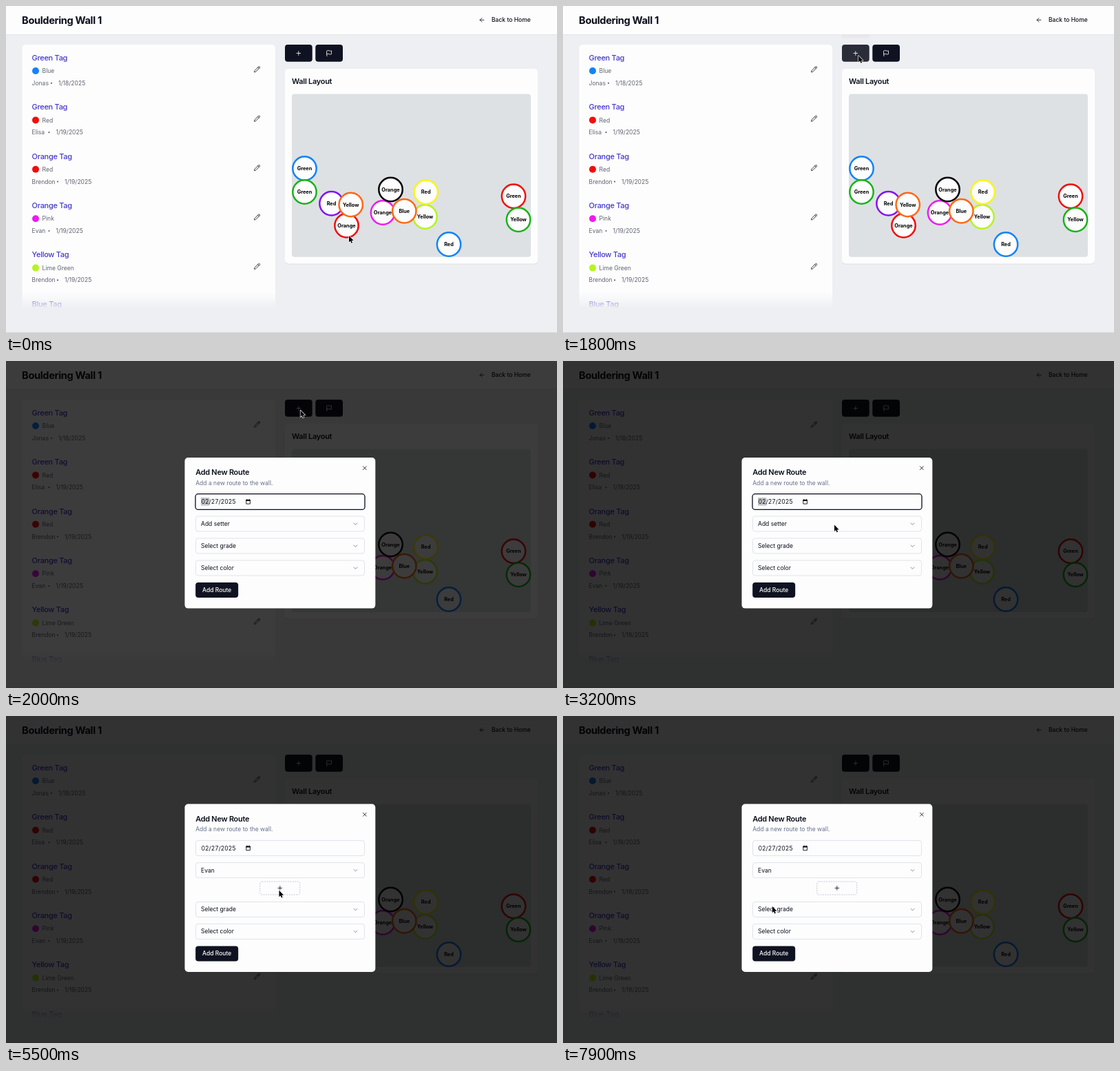
Animation of 800 by 474 pixels, one loop 8 s. Source, as an HTML page:

```html
<!DOCTYPE html>
<html lang="en">
<head>
<meta charset="utf-8">
<title>Bouldering Wall</title>
<style>
  html, body { margin: 0; width: 100%; height: 100%; overflow: hidden; background: #eeeff2; }
  svg { display: block; width: 800px; height: 474px; }
  text { font: 400 8.54px Inter, sans-serif; fill: #0b0f1a; white-space: pre; }
  .h1 { font-size: 14.64px; font-weight: 700; letter-spacing: -.025em; }
  .h2 { font-size: 10.98px; font-weight: 600; letter-spacing: -.025em; }
  .tag { font-size: 10.98px; font-weight: 500; letter-spacing: -.025em; fill: #4338ca; }
  .med { font-weight: 500; }
  .meta { fill: #5f636e; }
  .hold { font-size: 7.32px; font-weight: 700; text-anchor: middle; fill: #000; }
  .date { font-variant-numeric: tabular-nums; }
  .icon { fill: none; stroke: #0b0f1a; stroke-width: 2; stroke-linecap: round; stroke-linejoin: round; }
  .box { fill: #fdfdfe; stroke: #e0e3ea; }
</style>
</head>
<body>
<svg id="stage" viewBox="0 0 800 474" xmlns="http://www.w3.org/2000/svg"></svg>
<script>
const LOOP = 8000, STEP = 100;

const ICONS = {
  plus: 'M5 12h14M12 5v14',
  flag: 'M4 15s1-1 4-1 5 2 8 2 4-1 4-1V3s-1 1-4 1-5-2-8-2-4 1-4 1zM4 22v-7',
  back: 'M12 19l-7-7 7-7M19 12H5',
  pencil: 'M21.174 6.812a1 1 0 0 0-3.986-3.987L3.842 16.174a2 2 0 0 0-.5.83l-1.321 4.352a.5.5 0 0 0 .623.622l4.353-1.32a2 2 0 0 0 .83-.497zM15 5l4 4',
  down: 'M6 9l6 6 6-6',
  close: 'M18 6L6 18M6 6l12 12',
  user: 'M20 21a8 8 0 0 0-16 0M7 8a5 5 0 1 0 10 0a5 5 0 1 0-10 0'
};

const HUE = {
  blue: '#1383f6', red: '#f20d0d', pink: '#ee1bee', lime: '#b5f51e', purple: '#8414ee',
  orange: '#fb6a15', green: '#18b318', yellow: '#fbf41b', black: '#050505'
};

// tag, hue, hue label, setter, date, bullet x, date x
const ROUTES = [
  ['Green', 'blue', 'Blue', 'Jonas', '1/18/2025', 67.5, 76],
  ['Green', 'red', 'Red', 'Elisa', '1/19/2025', 64, 72.5],
  ['Orange', 'red', 'Red', 'Brendon', '1/19/2025', 76.5, 85],
  ['Orange', 'pink', 'Pink', 'Evan', '1/19/2025', 64, 72.5],
  ['Yellow', 'lime', 'Lime Green', 'Brendon', '1/19/2025', 76.5, 85],
  ['Blue']
];

const HOLDS = [
  ['Green', 'blue', 433.5, 235.5], ['Green', 'green', 433.5, 269.5],
  ['Red', 'purple', 472.5, 286.3], ['Orange', 'red', 494.5, 318.3],
  ['Yellow', 'orange', 500.7, 288], ['Orange', 'pink', 547, 299.5],
  ['Orange', 'black', 558.5, 266], ['Yellow', 'lime', 608.5, 305.5],
  ['Blue', 'orange', 578.3, 297.3], ['Red', 'yellow', 609.7, 269.7],
  ['Red', 'blue', 643, 345.5], ['Green', 'red', 737, 275.7],
  ['Yellow', 'green', 744, 309.7]
];

const SETTERS = ['Evan', 'Brendon', 'Oscar', 'Warrick', 'Ned', 'Lena'];

// time, x, y of the pointer tip
const POINTER = [
  [0, 498, 333], [500, 498, 333], [1400, 430, 75], [1800, 429, 72], [1900, 427.5, 71.5],
  [2200, 427.5, 71.5], [3100, 395, 238.5], [3200, 394, 237.5], [3700, 394, 237.5],
  [4000, 392.3, 261.3], [4700, 392.3, 261.3], [5300, 396.5, 252.8], [5600, 396.5, 252.8],
  [6500, 346, 268], [7000, 330, 284], [7100, 330, 284], [7900, 303.8, 275.8], [8000, 303.8, 275.8]
];

const text = (x, y, str, cls = '', extra = '') =>
  `<text x="${x}" y="${y}" class="${cls}" ${extra}>${str}</text>`;
const rect = (x, y, w, h, r, attrs) =>
  `<rect x="${x}" y="${y}" width="${w}" height="${h}" rx="${r}" ${attrs}/>`;
const icon = (name, cx, cy, size = 9.8, attrs = '') =>
  `<path class="icon" d="${ICONS[name]}" transform="translate(${cx - size / 2} ${cy - size / 2}) scale(${size / 24})" ${attrs}/>`;
const group = (id, body, attrs = '') => `<g id="${id}" ${attrs}>${body}</g>`;
const white = 'style="stroke:#fff"';

function route([tag, hue, label, setter, date, dotX, dateX], i) {
  const y = 71.4 * i;
  let out = text(37.6, 78.7 + y, tag + ' Tag', 'tag');
  if (!hue) return out;
  out += `<circle cx="43" cy="${94 + y}" r="5" fill="${HUE[hue]}"/>`;
  out += text(52.6, 97.2 + y, label, 'meta');
  out += text(37.6, 114.7 + y, setter, 'meta');
  out += `<circle cx="${dotX - 1.5}" cy="${111.8 + y}" r="1.1" fill="#5f636e"/>`;
  out += text(dateX, 114.7 + y, date, 'meta');
  return out + icon('pencil', 364.5, 91.8 + y);
}

const hold = ([label, hue, x, y]) =>
  `<circle cx="${x}" cy="${y}" r="17.2" fill="#fdfdfd" stroke="${HUE[hue]}" stroke-width="2.5"/>` +
  text(x, y + 2.7, label, 'hold');

const field = (y, label, id = '') =>
  rect(275.5, y, 245, 22, 3.5, 'class="box"') +
  text(283, y + 14.1, label, '', id && `id="${id}"`) +
  icon('down', 507.5, y + 11.2, 9.8, 'opacity=".55"');

const ring = (id, y) =>
  group(id, rect(275, y - .3, 246, 22.7, 4, 'fill="none" stroke="#10131f" stroke-width="1.3"'));

function page() {
  const list = rect(23.5, 56, 367.5, 390, 5, 'fill="#fdfdfe"') + ROUTES.map(route).join('');
  return rect(0, 0, 800, 474, 0, 'fill="#eeeff2"') +
    rect(0, 473, 800, 1, 0, 'fill="#d3d4d8"') +
    group('tip', rect(405, 36, 40, 10.5, 2, 'fill="#e5e6ea"')) +
    rect(0, 0, 800, 41, 0, 'fill="#fdfdfe"') + rect(0, 41, 800, .8, 0, 'fill="#e1e3e8"') +
    text(23.1, 25.8, 'Bouldering Wall 1', 'h1') +
    icon('back', 691, 20.3) + text(705, 23.4, 'Back to Home', 'med') +
    `<g mask="url(#fade)">${list}</g>` +
    rect(405, 56, 39.7, 24.8, 4, 'id="add" fill="#0f1220"') + icon('plus', 424.8, 68.5, 9.8, white) +
    rect(449.3, 56, 39.7, 24.8, 4, 'fill="#0f1220"') + icon('flag', 469.2, 68.5, 9.8, white) +
    rect(405, 91.6, 367, 283, 5, 'fill="#dfe1e6"') + rect(405, 91, 367, 282.5, 5, 'fill="#fdfdfe"') +
    text(415, 113, 'Wall Layout', 'h2') +
    rect(415, 127.5, 347, 236.3, 4, 'fill="#dde1e4"') +
    HOLDS.map(hold).join('');
}

function dialog() {
  const calendar = '<path d="M348.8 201.5h5.6v5.6h-5.6z" fill="none" stroke="#0b0f1a" stroke-width=".9"/>' +
    '<path d="M348.4 200.9h6.4v2h-6.4zM349.4 200.1h1v1h-1zM352.8 200.1h1v1h-1z" fill="#0b0f1a"/>';
  const top = text(275.2, 165.2, 'Add New Route', 'h2') +
    text(275.2, 179.7, 'Add a new route to the wall.', '', 'style="fill:#64708a"') +
    icon('close', 520.8, 155.2) +
    rect(275.5, 193, 245, 22, 3.5, 'class="box"') + ring('dateRing', 193) +
    rect(283, 198, 12.3, 11.6, 0, 'id="pick" fill="#c3c5c6"') +
    text(283.5, 207, '02/27/2025', 'date') + calendar +
    field(225, 'Add setter', 'setter') + ring('setterRing', 225);
  const more = rect(368.7, 240, 58, 19, 3, 'fill="none" stroke="#c5cad6" stroke-dasharray="2 1.4"') +
    icon('plus', 397.8, 249.4);
  const bottom = field(257, 'Select grade') + field(289, 'Select color') +
    rect(275.2, 321, 62, 22, 4, 'fill="#0f1220"') + text(285, 335, 'Add Route', 'med', 'style="fill:#fff"');
  return rect(259.5, 140, 276.8, 218.6, 5, 'id="panel" fill="#fdfdfe"') +
    group('top', top) + group('more', more) + group('bottom', bottom);
}

function menu() {
  return rect(275.5, 250, 246, 158.3, 4, 'class="box"') +
    rect(278, 253, 241, 19, 2.5, 'fill="#ebeef5"') +
    SETTERS.map((name, i) => text(283, 265.5 + 19.7 * i, name)).join('') +
    rect(276, 380, 245, .8, 0, 'fill="#e3e6ee"') +
    icon('user', 288.2, 395.8) + text(297.7, 399, 'Add Guest Setter');
}

const stage = document.getElementById('stage');
stage.innerHTML = `<defs>
    <linearGradient id="ramp" gradientUnits="userSpaceOnUse" x1="0" y1="414" x2="0" y2="439">
      <stop offset="0" stop-color="#fff"/><stop offset="1" stop-color="#000"/>
    </linearGradient>
    <mask id="fade" maskUnits="userSpaceOnUse" x="0" y="0" width="800" height="474">
      ${rect(0, 0, 800, 474, 0, 'fill="url(#ramp)"')}
    </mask>
  </defs>` + page() +
  rect(0, 0, 800, 474, 0, 'id="shade" fill="#000"') +
  group('dialog', dialog()) + group('menu', menu()) +
  group('pointer', '<path d="M0 0V9.4L2.1 7.5 3.5 10.7 5.1 10 3.7 6.9H6.7Z" fill="#000" stroke="#fff" stroke-width="1.3" stroke-linejoin="round" paint-order="stroke"/>');

const el = {};
stage.querySelectorAll('[id]').forEach(node => el[node.id] = node);

const show = (node, on) => node.setAttribute('opacity', +on);
const shift = (node, x, y) => node.setAttribute('transform', `translate(${x} ${y})`);

function pointerAt(t) {
  const i = Math.max(1, POINTER.findIndex(p => p[0] >= t));
  const [t0, x0, y0] = POINTER[i - 1], [t1, x1, y1] = POINTER[i];
  const k = (t - t0) / (t1 - t0), e = k * k * (3 - 2 * k);
  return [x0 + (x1 - x0) * e, y0 + (y1 - y0) * e];
}

function draw(t) {
  const open = t >= 1900, chosen = t >= 4300, grow = chosen ? 12.4 : 0;
  show(el.tip, t >= 1700 && t < 1900 ? .6 : 0);
  el.add.setAttribute('fill', t >= 1400 && !open ? '#2a2c38' : '#0f1220');
  show(el.shade, !open ? 0 : t < 2000 ? .64 : t < 2100 ? .76 : .8);
  show(el.dialog, open);
  show(el.dateRing, t < 3400);
  show(el.pick, t < 3400);
  show(el.menu, t < 3400 || chosen ? 0 : t < 3500 ? .6 : 1);
  show(el.setterRing, t >= 4400 && t < 5500);
  show(el.more, chosen);
  el.setter.textContent = chosen ? SETTERS[0] : 'Add setter';
  el.panel.setAttribute('y', 140 - grow);
  el.panel.setAttribute('height', 218.6 + 2 * grow);
  shift(el.top, 0, -grow);
  shift(el.bottom, 0, grow);
  shift(el.pointer, ...pointerAt(t));
}

const start = performance.now();
function tick() {
  const t = (performance.now() - start) % LOOP;
  draw(Math.floor(t / STEP) * STEP);
  requestAnimationFrame(tick);
}
tick();
</script>
</body>
</html>
```
